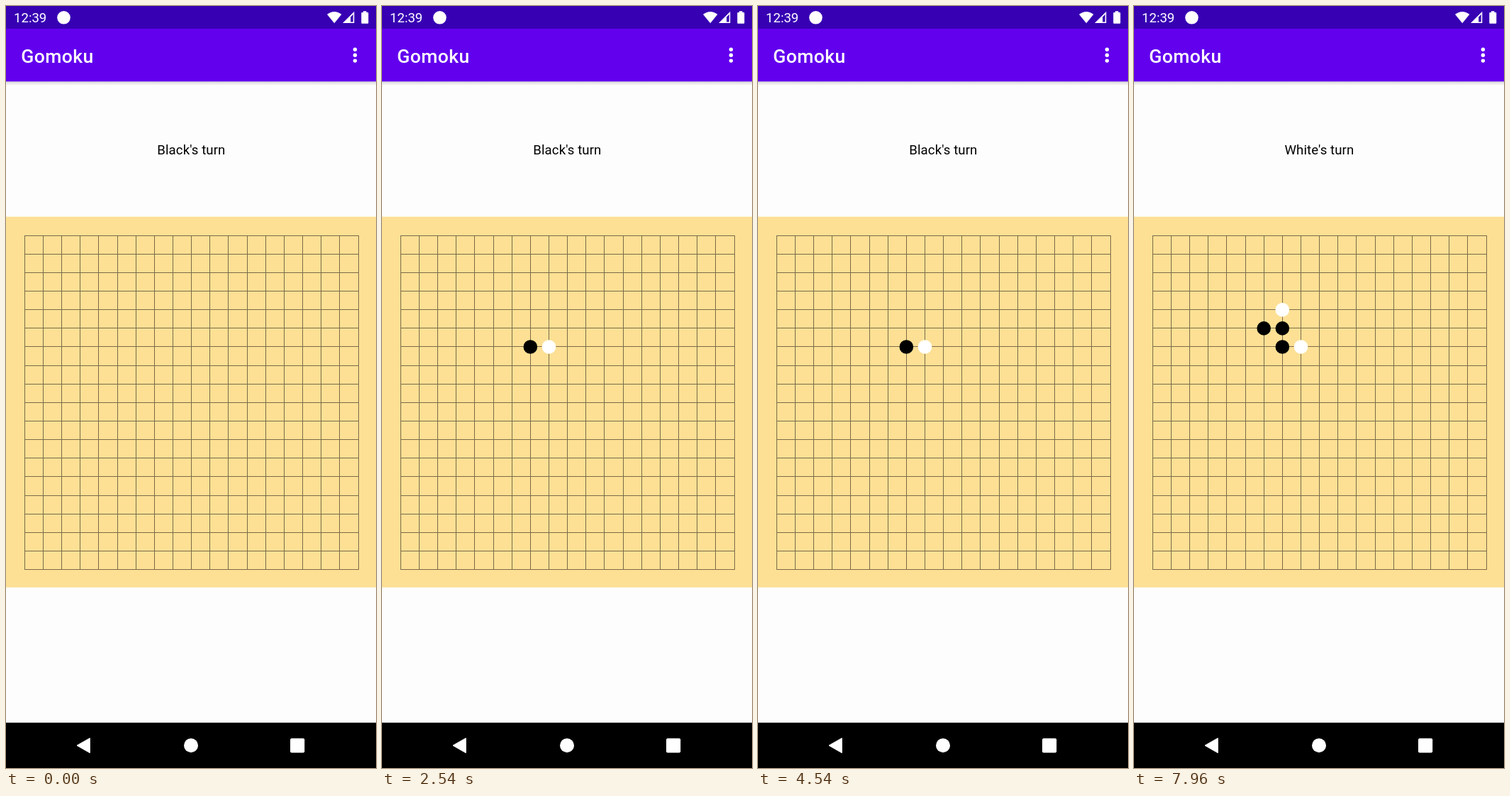
An HTML page that plays this animation: 522x1073 px, repeating every 8000 ms.

```html
<!DOCTYPE html>
<html lang="en">
<head>
<meta charset="utf-8">
<title>Gomoku</title>
<style>
  html, body { margin: 0; width: 100%; height: 100%; overflow: hidden; background: #fdfdfd; }
  svg { display: block; width: 100vw; height: 100vh; }
  text { font-family: Roboto, sans-serif; font-size: 18.6px; }
  .title { font-size: 26.6px; font-weight: 500; letter-spacing: .33px; }
  .turn { text-anchor: middle; letter-spacing: .1px; }
  .light { fill: #fff; }

  /* Every change is a hard cut inside one 8 s loop. */
  .cut { opacity: 0; animation: 8s step-end infinite; }
  #move1 { animation-name: move1; }
  #move2 { animation-name: move2; }
  #move3 { animation-name: move3; }
  #move4 { animation-name: move4; }
  #move5 { animation-name: move5; }
  #blackTurn { animation-name: black-turn; }
  #whiteTurn { animation-name: white-turn; }
  @keyframes move1 { 0% { opacity: 0 } 11.875%, 100% { opacity: 1 } }
  @keyframes move2 { 0% { opacity: 0 } 24.375%, 100% { opacity: 1 } }
  @keyframes move3 { 0% { opacity: 0 } 59.375%, 100% { opacity: 1 } }
  @keyframes move4 { 0% { opacity: 0 } 71%, 100% { opacity: 1 } }
  @keyframes move5 { 0% { opacity: 0 } 96.25%, 100% { opacity: 1 } }
  @keyframes black-turn {
    0%, 24.375%, 71% { opacity: 1 }
    11.875%, 59.375%, 96.25%, 100% { opacity: 0 }
  }
  @keyframes white-turn {
    0%, 24.375%, 71% { opacity: 0 }
    11.875%, 59.375%, 96.25%, 100% { opacity: 1 }
  }
</style>
</head>
<body>
<svg viewBox="0 0 522 1073">
  <defs>
    <linearGradient id="shade" x2="0" y2="1">
      <stop stop-opacity=".16"/>
      <stop offset="1" stop-opacity="0"/>
    </linearGradient>
  </defs>
  <rect width="522" height="1073" fill="#fdfdfd"/>

  <!-- app bar -->
  <rect y="106" width="522" height="6" fill="url(#shade)"/>
  <rect width="522" height="106.3" fill="#6200ee"/>
  <g class="light">
    <text class="title" x="21.3" y="79.5">Gomoku</text>
    <circle cx="492.4" cy="61.3" r="2.7"/>
    <circle cx="492.4" cy="69.2" r="2.7"/>
    <circle cx="492.4" cy="77.1" r="2.7"/>
  </g>

  <!-- status bar -->
  <rect width="522" height="31.9" fill="#3700b3"/>
  <g class="light">
    <text x="11" y="23">12:39</text>
    <circle cx="81.5" cy="16.3" r="9.3"/>
    <path d="M453 11.8Q463.2 4 473.4 11.8L463.2 24.2Z"/>
    <path d="M491.3 7.8V24H475ZM489.7 11.8L486.2 15.4V22.4H489.7Z" fill-rule="evenodd"/>
    <path d="M504 9V7.3H508.500V9H510.300Q511.300 9 511.300 10V23.500Q511.300 24.700 510.300 24.700H502.300Q501.300 24.700 501.300 23.500V10Q501.300 9 502.300 9Z"/>
  </g>

  <text id="blackTurn" class="turn cut" x="261.4" y="209.3">Black's turn</text>
  <text id="whiteTurn" class="turn cut" x="261.4" y="209.3">White's turn</text>

  <!-- board -->
  <rect y="296.7" width="522" height="522" fill="#fde094"/>
  <path id="grid" fill="#7a6a48" shape-rendering="crispEdges"/>
  <g id="stones"></g>

  <!-- navigation bar -->
  <rect y="1009.2" width="522" height="64"/>
  <g class="light">
    <path d="M100 1041.3L118.300 1030.900V1051.700Z" stroke="#fff" stroke-linejoin="round"/>
    <circle cx="261" cy="1041.2" r="10"/>
    <rect x="401" y="1031.2" width="20.2" height="20.2" rx="2"/>
  </g>
</svg>
<script>
  const LINES = 19;
  const colX = k => 26.16 * k + .05;
  const rowY = k => 26.14 * k + 297;
  const px = Math.floor;

  const left = px(colX(1)), right = px(colX(LINES)) + 1;
  const upper = px(rowY(1)), lower = px(rowY(LINES)) + 1;
  let d = '';
  for (let k = 1; k <= LINES; k++) {
    d += `M${px(colX(k))} ${upper}h1V${lower}h-1Z`;
    d += `M${left} ${px(rowY(k))}H${right}v1H${left}Z`;
  }
  document.getElementById('grid').setAttribute('d', d);

  // [column, row] in playing order; black moves first
  const moves = [[8, 7], [9, 7], [8, 6], [8, 5], [7, 6]];
  document.getElementById('stones').innerHTML = moves.map(([c, r], i) =>
    `<circle id="move${i + 1}" class="cut" cx="${colX(c)}" cy="${rowY(r)}" r="9.8" fill="${i % 2 ? '#fff' : '#000'}"/>`
  ).join('');
</script>
</body>
</html>
```
